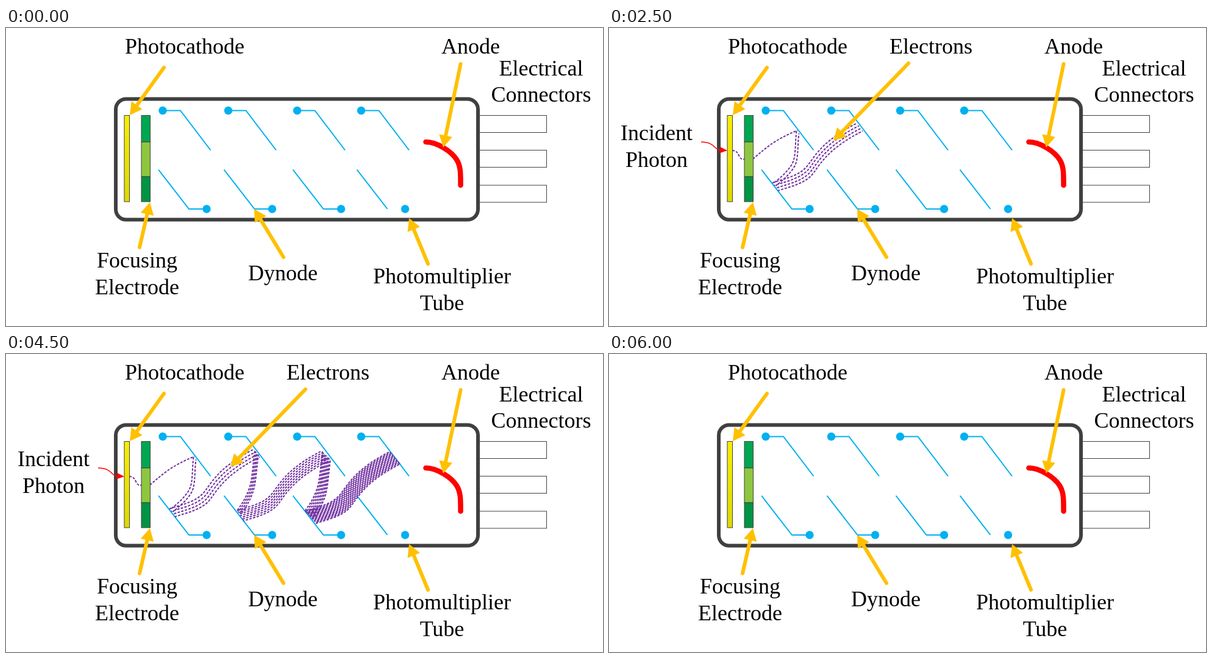
Write an HTML page that moves like this. It is 979 by 489 pixels and loops after 8500 ms.

```html
<!DOCTYPE html>
<html lang="en">
<head>
<meta charset="utf-8">
<style>
html, body { margin: 0; width: 100%; height: 100%; overflow: hidden; background: #fff; }
svg { display: block; width: 100%; height: 100%; }
text { font: 36px "Liberation Serif", "Times New Roman", serif; text-anchor: middle; }
.beam { fill: none; stroke: #7030a0; stroke-width: 2; stroke-dasharray: 4 2.2; }
.early .beam { stroke: #6b5563; }
</style>
</head>
<body>
<svg id="stage" viewBox="0 0 979 489">
  <defs>
    <linearGradient id="yellow" x2="0" y2="1">
      <stop stop-color="#f7ee00"/><stop offset="1" stop-color="#dcd800"/>
    </linearGradient>
  </defs>
</svg>
<script>
const LOOP = 8500, STEP = 500, LAST = 12;
const stage = document.getElementById('stage');
const staged = [];

function add(tag, attrs, parent = stage) {
  const el = document.createElementNS('http://www.w3.org/2000/svg', tag);
  for (const key in attrs) el.setAttribute(key, attrs[key]);
  return parent.appendChild(el);
}

// A group that is visible from the given step until the reset.
function from(step) {
  const group = add('g', {});
  staged.push({ group, step });
  return group;
}

function label(x, y, words, parent) {
  words.split('|').forEach((word, i) =>
    add('text', { x, y: y + i * 43.5 }, parent).textContent = word);
}

function arrow(x1, y1, x2, y2, parent) {
  const length = Math.hypot(x2 - x1, y2 - y1);
  const ux = (x2 - x1) / length, uy = (y2 - y1) / length;
  const bx = x2 - 20 * ux, by = y2 - 20 * uy;
  add('path', { d: `M${x1} ${y1}L${bx} ${by}`, stroke: '#ffc000',
    'stroke-width': 6, 'stroke-linecap': 'round' }, parent);
  add('path', { d: `M${x2} ${y2}L${bx - 11 * uy} ${by + 11 * ux}L${bx + 11 * uy} ${by - 11 * ux}Z`,
    fill: '#ffc000' }, parent);
}

function box(x, y, width, height, fill) {
  add('rect', { x, y, width, height, fill, stroke: '#404040' });
}

// Copies of one curve, spread from (x, y) along (dx, dy), with staggered dashes.
function beam(step, count, d, x, y, dx, dy) {
  const group = from(step);
  for (let i = 0; i < count; i++) {
    const k = count > 1 ? i / (count - 1) : 0;
    add('path', { d, class: 'beam', 'stroke-dashoffset': i * 2.4,
      transform: `translate(${x + k * dx} ${y + k * dy})` }, group);
  }
}

// Tube, connectors and electrodes
add('rect', { x: 180, y: 116.5, width: 594, height: 198, rx: 17, fill: 'none',
  stroke: '#404040', 'stroke-width': 6 });
for (const y of [143.5, 200.5, 258]) box(776.5, y, 110, 28, '#fff');
box(194, 143.5, 8.5, 141.5, 'url(#yellow)');
box(222, 143.5, 14.5, 43.5, '#00a651');
box(222, 187, 14.5, 57, '#8dc63f');
box(222, 244, 14.5, 41, '#009444');

// Dynodes
const blue = { fill: 'none', stroke: '#00b0f0', 'stroke-width': 2 };
[0, 107.5, 220.5, 325.5].forEach((dx, i) => {
  const x = 250 + dx;
  add('path', { ...blue, d: `M${x + 7} 135.5h29l49.5 65` });
  add('path', { ...blue, d: `M${x} 232.5l50 64.5` + (i < 3 ? 'h29' : '') });
  for (const [cx, cy] of [[x + 7, 135.5], [x + 79, 297]])
    add('circle', { cx, cy, r: 6.7, fill: '#00b0f0' });
});
add('path', { ...blue, d: 'M625.5 297h29' }, from(10));

// Incident photon
const photon = from(1);
label(78, 184, 'Incident|Photon', photon);
add('path', { d: 'M151 187C164 187 169 191 174 196Q178 200 184 200.5', fill: 'none',
  stroke: '#f00', 'stroke-width': 1.6 }, photon);
add('path', { d: 'M194 201L181 205.5L183 195.5Z', fill: '#f00' }, photon);

// Electron paths
const up = 'M0 0C24 -8 46 -12 59 -30S86 -71 139 -98';
const down = 'M0 0C-4 30 -4 48 -10 64S-22 88 -29 98';
beam(2, 1, 'M0 0C8 0 9 5 12 10S17 15 20 14', 202, 201, 0, 0);
beam(3, 1, 'M0 0C20 -17 34 -31 73 -47', 236, 215, 0, 0);
beam(4, 2, 'M0 0C-3 24 0 44 -9 57S-28 78 -38 86', 307.5, 169, 4, 4);
beam(5, 4, up, 268, 254, 9, 13);
beam(6, 4, down, 408, 159, 6, 6);
beam(7, 7, up, 379, 257, 10, 17);
beam(8, 8, down, 519, 160, 13, 13);
beam(9, 14, up, 491, 258, 17, 20);
beam(10, 18, down, 630, 161, 16, 17);
beam(11, 22, 'M0 0C24 -10 38 -22 50 -35S80 -56 127 -56', 600, 262, 17, 27);

// Anode and labels
add('path', { d: 'M688.5 187C707 187 731 203 739 216C746 227 745.5 240 745.5 258', fill: 'none',
  stroke: '#f00', 'stroke-width': 8.5, 'stroke-linecap': 'round' });
label(293, 42, 'Photocathode');
label(762, 42, 'Anode');
label(877.5, 77.5, 'Electrical|Connectors');
label(215, 393, 'Focusing|Electrode');
label(454, 414, 'Dynode');
label(715, 419, 'Photomultiplier|Tube');
arrow(259, 65, 203, 143);
arrow(745.5, 59, 717, 196);
arrow(219, 360, 236, 286);
arrow(455, 376, 407, 297);
arrow(692, 387, 661, 312);
const electrons = from(5);
label(528, 42, 'Electrons', electrons);
arrow(491, 58, 368, 185, electrons);

const start = performance.now();
function draw(now) {
  const step = Math.floor(Math.max(0, now - start) % LOOP / STEP);
  for (const { group, step: first } of staged)
    group.style.display = step >= first && step < LAST ? '' : 'none';
  stage.classList.toggle('early', step < 4);
  requestAnimationFrame(draw);
}
draw(start);
</script>
</body>
</html>
```
